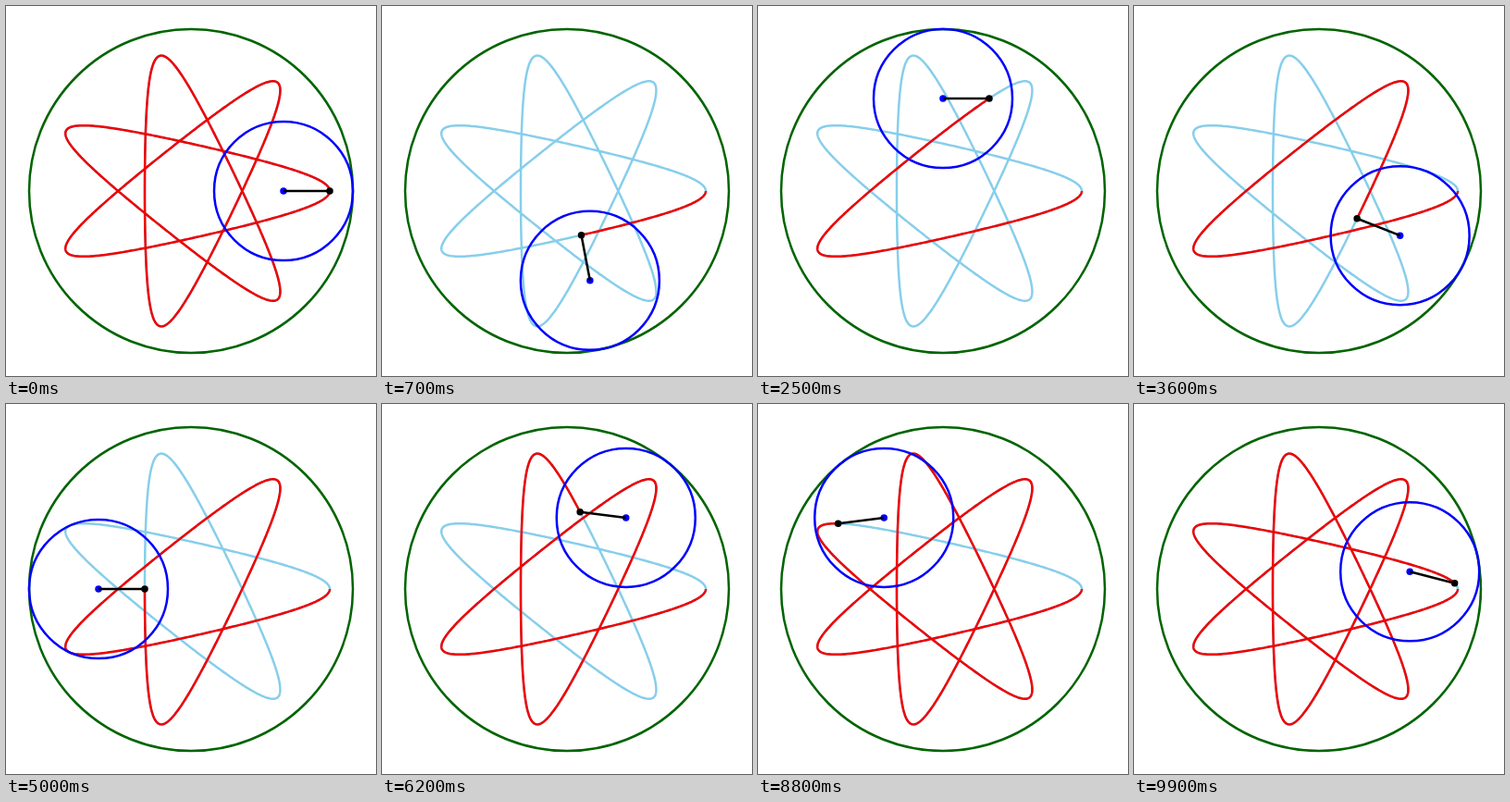
Write an HTML page that moves like this. It is 400 px wide and 400 px high and loops after 10 s.

```html
<!DOCTYPE html>
<html lang="en">
<head>
<meta charset="utf-8">
<title>Hypotrochoid</title>
<style>
  html, body { margin: 0; width: 100%; height: 100%; overflow: hidden; background: #fff; }
  svg { display: block; width: 100vw; height: 100vh; }
  .line { fill: none; stroke-width: 2.5; stroke-linejoin: round; }
</style>
</head>
<body>
<svg viewBox="0 0 400 400">
  <g transform="translate(200 200)">
    <circle class="line" r="175" stroke="#006400"/>
    <path class="line" id="curve" stroke="#87ceeb"/>
    <path class="line" id="trace" stroke="#f00000"/>
    <g id="wheel">
      <circle class="line" r="75" stroke="#00f"/>
      <circle r="3.75" fill="#00f"/>
      <line class="line" id="arm" stroke="#000"/>
      <circle id="pen" r="3.75"/>
    </g>
  </g>
</svg>
<script>
  const LOOP = 10000, STEP = 100, STEPS = LOOP / STEP;
  const R = 175, r = 75, d = 50, TURNS = 3, DETAIL = 10;
  const $ = id => document.getElementById(id);

  // Wheel centre and pen offset after a fraction of the loop
  function pose(part) {
    const a = part * TURNS * 2 * Math.PI;
    const b = -a * (R - r) / r;
    return {
      cx: (R - r) * Math.cos(a), cy: (R - r) * Math.sin(a),
      px: d * Math.cos(b), py: d * Math.sin(b)
    };
  }

  const points = Array.from({ length: STEPS * DETAIL + 1 }, (_, i) => {
    const p = pose(i / (STEPS * DETAIL));
    return (p.cx + p.px).toFixed(2) + ' ' + (p.cy + p.py).toFixed(2);
  });
  const pathTo = step => 'M' + points.slice(0, step * DETAIL + 1).join('L');

  function set(el, attrs) {
    for (const key in attrs) el.setAttribute(key, attrs[key]);
  }

  let last = -1;
  function draw(now) {
    const step = Math.floor((now % LOOP) / STEP);
    if (step !== last) {
      last = step;
      const p = pose(step / STEPS);
      // The loop opens on the finished curve
      set($('trace'), { d: pathTo(step || STEPS) });
      set($('wheel'), { transform: `translate(${p.cx} ${p.cy})` });
      set($('arm'), { x2: p.px, y2: p.py });
      set($('pen'), { cx: p.px, cy: p.py });
    }
  }

  set($('curve'), { d: pathTo(STEPS) });
  const start = performance.now();
  function tick() {
    draw(performance.now() - start);
    requestAnimationFrame(tick);
  }
  tick();
</script>
</body>
</html>
```
